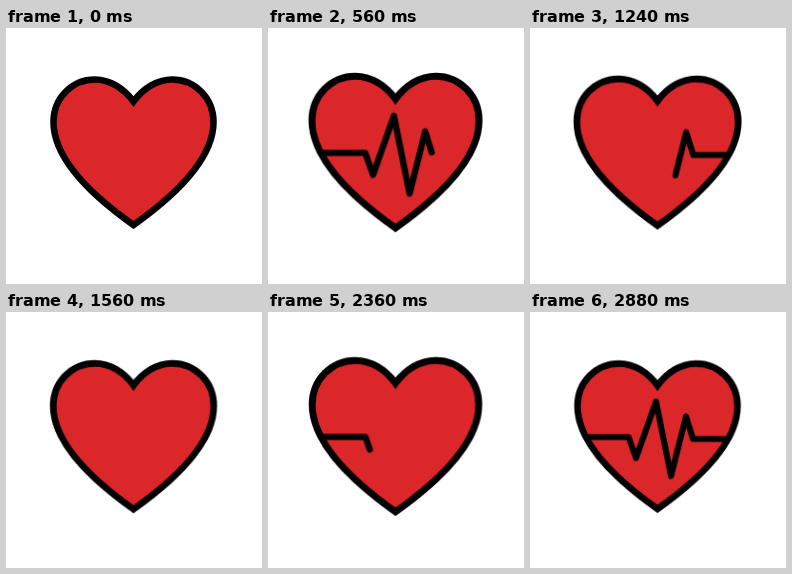
Animation of 256x256 px, one loop 6000 ms. Source, as an HTML page:

```html
<!DOCTYPE html>
<html lang="en">
<head>
<meta charset="utf-8">
<title>Heartbeat</title>
<style>
  html, body {
    margin: 0;
    width: 100%;
    height: 100%;
    overflow: hidden;
    background: #fff;
  }
  svg {
    display: block;
    width: 100%;
    height: 100%;
  }
  .beat {
    transform-origin: 128px 128px;
    animation: beat 6s cubic-bezier(.37, 0, .63, 1) infinite;
  }
  .heart {
    fill: #db272a;
    stroke: #000;
    stroke-width: 6.6;
    stroke-linejoin: miter;
  }
  .pulse {
    fill: none;
    stroke: #000;
    stroke-width: 6;
    stroke-linecap: round;
    stroke-linejoin: round;
    stroke-dasharray: 100 200;
    animation: pulse 6s cubic-bezier(.37, 0, .63, 1) infinite;
  }

  /* two beats of 1.44 s, then rest */
  @keyframes beat {
    0%, 24%, 48%, 100% { transform: scale(1); }
    12%, 36% { transform: scale(1.05); }
  }

  /* draw, wipe from the left, draw again and stay */
  @keyframes pulse {
    0% { stroke-dashoffset: 101; }
    12%, 13.333% { stroke-dashoffset: 0; }
    25.333% { stroke-dashoffset: -101; animation-timing-function: step-end; }
    36% { stroke-dashoffset: 101; }
    48%, 100% { stroke-dashoffset: 0; }
  }
</style>
</head>
<body>
<svg viewBox="0 0 256 256">
  <g class="beat">
    <path class="heart" d="M127.5 73.5 C118 60.5 104 51.5 89 51.5 C66 51.5 47.5 70 47.5 94
      C47.5 132 88 169 127.5 197 C167 169 207.5 132 207.5 94
      C207.5 70 189 51.5 166 51.5 C151 51.5 137 60.5 127.5 73.5 Z"/>
    <path class="pulse" pathLength="100"
      d="M57 125 H98.5 L106 146 L126 89.5 L141 164 L156 104.5 L163 127 H197"/>
  </g>
</svg>
</body>
</html>
```
